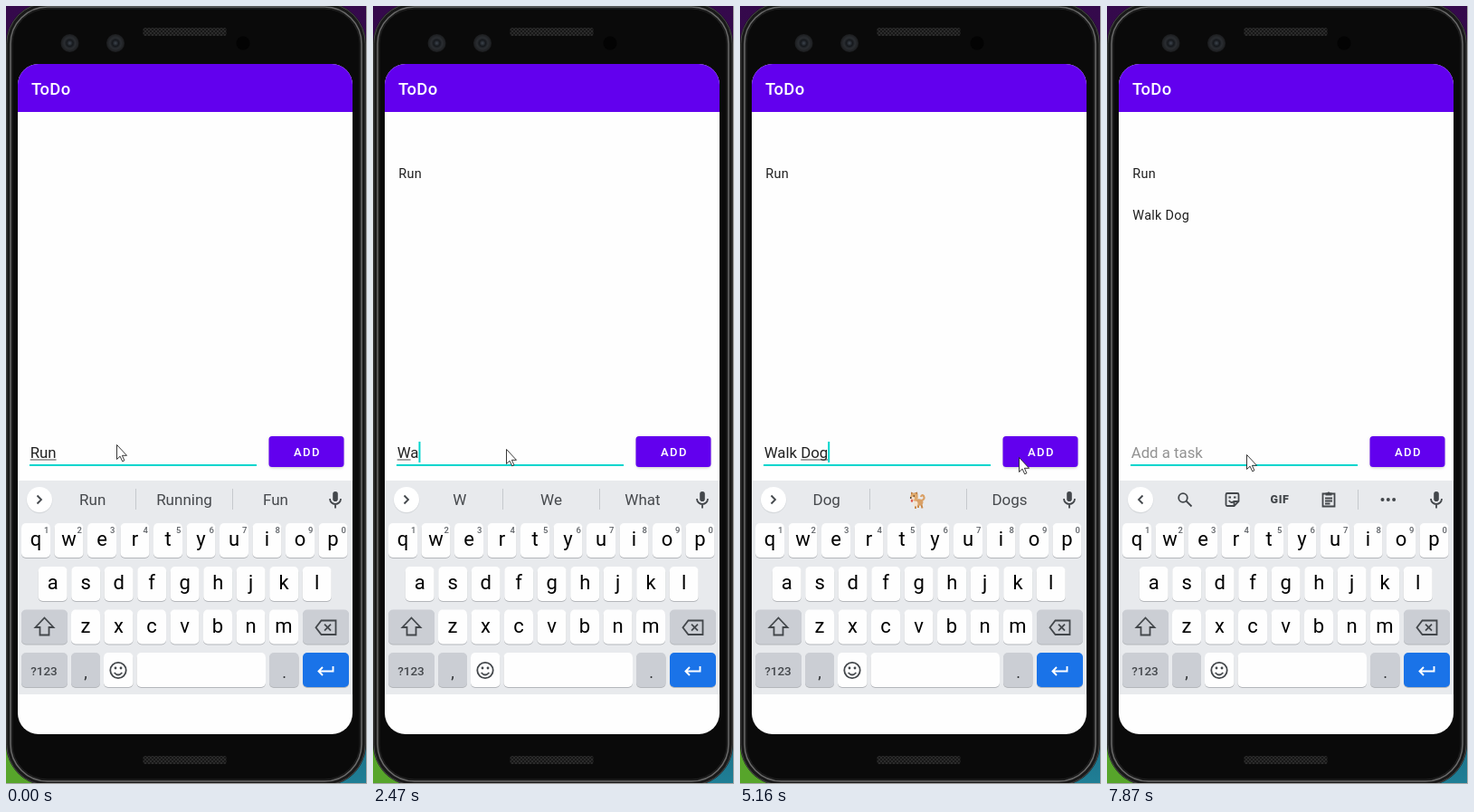
These frames come from a looping animation (399 by 859 pixels, 8 s). An HTML page:

```html
<!DOCTYPE html>
<html lang="en">
<head>
<meta charset="utf-8">
<title>ToDo</title>
<style>
  html, body { margin: 0; width: 100%; height: 100%; overflow: hidden; background: #12081a; }
  svg { display: block; font-family: Roboto, sans-serif; }
  text { white-space: pre; }
  .rim { fill: none; }
  .item { font-size: 14.4px; letter-spacing: .3px; fill: #1f1f1f; }
  .field { font-size: 16.8px; }
  .word { font-size: 17px; fill: #46494d; text-anchor: middle; }
  .letter { font-size: 22px; fill: #000; text-anchor: middle; }
  .mark { font-size: 18px; fill: #2e3134; text-anchor: middle; }
  .digit { font-size: 9.5px; font-weight: 500; fill: #5f6368; text-anchor: middle; }
  .icon { fill: none; stroke: #43474b; stroke-width: 1.8; }
  .solid { fill: #43474b; }
  .split { stroke: #c6c9cd; }
</style>
</head>
<body>
<svg width="399" height="859" viewBox="0 0 399 859">
  <defs>
    <linearGradient id="wall" x2="0" y2="1">
      <stop offset="0" stop-color="#35094c"/>
      <stop offset=".6" stop-color="#1b1030"/>
      <stop offset="1" stop-color="#1f7f96"/>
    </linearGradient>
    <pattern id="mesh" width="4" height="4" patternUnits="userSpaceOnUse">
      <rect width="4" height="4" fill="#2b2b2b"/>
      <path d="M0 0L4 4M4 0L0 4" stroke="#171717"/>
    </pattern>
    <radialGradient id="lens">
      <stop offset="0" stop-color="#3d444d"/>
      <stop offset=".35" stop-color="#15181c"/>
      <stop offset=".6" stop-color="#2a2d31"/>
      <stop offset="1" stop-color="#1b1c1e"/>
    </radialGradient>
    <clipPath id="screen"><rect x="13" y="64" width="370" height="740" rx="23"/></clipPath>
    <filter id="soft" x="-20%" y="-40%" width="140%" height="200%"><feGaussianBlur stdDeviation="1.8"/></filter>
  </defs>

  <rect width="399" height="859" fill="url(#wall)"/>
  <path d="M0 800H60V859H0Z" fill="#57a52b"/>
  <rect x="0" y="-4" width="398" height="865" rx="46" fill="#191919"/>
  <rect class="rim" x=".8" y="-3.200" width="396.400" height="863.400" rx="45" stroke="#484848"/>
  <rect class="rim" x="5" y="1" width="388" height="855" rx="41" stroke="#6a6a6a" stroke-width="1.500"/>
  <rect x="7" y="3" width="384" height="851" rx="39" fill="#0a0a0a" stroke="#202020"/>
  <path d="M398 0h1v859h-399v-1h398z" fill="#a8a8a8"/>
  <rect x="151.5" y="24" width="92" height="9" rx="2" fill="url(#mesh)"/>
  <rect x="151.5" y="828" width="92" height="9" rx="2" fill="url(#mesh)"/>
  <circle cx="70.5" cy="41" r="10" fill="url(#lens)"/>
  <circle cx="121" cy="41" r="10" fill="url(#lens)"/>
  <circle cx="262" cy="41" r="7.5" fill="#030303"/>

  <g clip-path="url(#screen)">
    <rect x="13" y="64" width="370" height="740" fill="#fefefe"/>
    <rect x="13" y="64" width="370" height="53" fill="#6200ee"/>
    <text x="28" y="97.500" font-size="18.400" font-weight="500" letter-spacing=".3" fill="#fff">ToDo</text>
    <text class="item" x="28.300" y="190">Run</text>
    <text class="item" x="28.300" y="235.500">Walk Dog</text>

    <rect x="26" y="506" width="251" height="2" fill="#03d5cd"/>
    <text id="hint" class="field" x="26.7" y="499" fill="#929292">Add a task</text>
    <text id="typed" class="field" x="26.7" y="499" fill="#212121"></text>
    <rect id="under" y="500.5" height="1" fill="#4a4a4a"/>
    <rect id="caret" y="481" width="2" height="23" fill="#03d5cd"/>

    <rect id="shade" x="291" width="82" height="34" rx="4" filter="url(#soft)"/>
    <rect id="button" x="290.5" y="475" width="83" height="34" rx="3.5"/>
    <text x="318" y="496.700" font-size="13" font-weight="500" letter-spacing="1.4" fill="#fff">ADD</text>

    <rect x="13" y="524" width="370" height="236" fill="#e8eaed"/>
    <circle cx="37" cy="545.8" r="14.4" fill="#d6d9dc"/>
    <circle cx="37" cy="545" r="14" fill="#fff"/>
    <path id="chevron" class="icon"/>
    <g id="words">
      <path class="split" d="M143.5 533V556M250.5 533V556"/>
      <text class="word" x="95.700" y="551.200"></text>
      <text class="word" x="197" y="551.200"></text>
      <text class="word" x="298" y="551.200"></text>
      <g id="dog">
        <path d="M200 546q5-1 3-5q-2-2-3 1" fill="none" stroke="#d9a066" stroke-width="2.200"/>
        <path d="M194 550v5M197 550v4M200 549l1.500 5.500" stroke="#c98a4b" stroke-width="2"/>
        <ellipse cx="197.500" cy="548" rx="5" ry="3.800" fill="#d9a066"/>
        <ellipse cx="194" cy="549.500" rx="2.500" ry="3" fill="#f3e4d2"/>
        <path d="M189 540v-3.500l3 1.500 4-1.500.5 4z" fill="#b97a3f"/>
        <circle cx="192.500" cy="542" r="4.300" fill="#dfa96c"/>
        <ellipse cx="190.500" cy="543.800" rx="2.600" ry="2" fill="#f3e4d2"/>
        <ellipse cx="190" cy="546.300" rx="1.100" ry="1.700" fill="#e2574c"/>
        <circle cx="192.300" cy="541" r=".8" fill="#3a2a20"/>
        <circle cx="188.800" cy="543" r=".9" fill="#3a2a20"/>
      </g>
    </g>
    <g id="tools">
      <circle class="icon" cx="84" cy="543" r="4.800"/>
      <path class="icon" d="M87.500 546.500L93.500 552.500" stroke-width="2.200"/>
      <path class="icon" d="M133 538H144Q145.500 538 145.500 539.500V547L140.500 552H133Q131.500 552 131.500 550.500V539.500Q131.500 538 133 538ZM145 547H140.500V552M134.800 546q2.500 3.500 5.500 1" stroke-width="1.600"/>
      <path class="solid" d="M134.500 541.500h2.500v2h-2.500zM140 541.500h2.500v2h-2.500z"/>
      <text class="solid" x="191" y="549.300" font-size="12.500" font-weight="900" text-anchor="middle" letter-spacing=".6">GIF</text>
      <path class="icon" d="M238.500 538.500H251.500V552.500H238.500ZM241 543.500H249M241 546.500H249M241 549.500H246.500" stroke-width="1.600"/>
      <path class="solid" d="M241.500 537.500h2a1.600 1.600 0 0 1 3 0h2v3h-7z"/>
      <path class="split" d="M277.500 534V556"/>
      <g class="solid">
        <circle cx="304.500" cy="545" r="2"/><circle cx="310.800" cy="545" r="2"/><circle cx="317.100" cy="545" r="2"/>
      </g>
    </g>
    <rect class="solid" x="361.200" y="536" width="5.600" height="11" rx="2.800"/>
    <path class="icon" d="M358 544a6 6 0 0 0 12 0M364 550V554.500" stroke-width="1.700"/>

    <g id="keys"></g>
    <path id="shift" class="icon" d="M42.500 675.500L52.500 686H47.500V694.500H37.500V686H32.500Z"/>
    <path class="icon" d="M348.500 678.500H364.500V694H348.500L342.500 686.200ZM352 682.700L359 689.700M359 682.700L352 689.700"/>
    <text class="solid" x="42" y="738.500" font-size="13.500" font-weight="500" text-anchor="middle">?123</text>
    <circle class="icon" cx="124" cy="733.500" r="8.700"/>
    <path class="icon" d="M119.700 736q4.300 5 8.600 0"/>
    <circle class="solid" cx="121" cy="731" r="1.400"/>
    <circle class="solid" cx="127" cy="731" r="1.400"/>
    <path d="M361.500 729V734.500H345.500M350 730L345.500 734.500L350 739" fill="none" stroke="#fff" stroke-width="1.900"/>
  </g>
  <path id="pointer" d="M0 0V16L3.600 12.700L6.200 18.300L8.400 17.300L5.900 11.800H11Z" fill="#fff" stroke="#222" stroke-width=".9"/>
</svg>

<script>
const LOOP = 8000, LEFT = 26.7, PITCH = 36.5;
const $ = id => document.getElementById(id);
const set = (el, attrs) => { for (const k in attrs) el.setAttribute(k, attrs[k]); };
const show = (el, on) => { el.style.display = on ? '' : 'none'; };

function add(tag, attrs, label = '') {
  const el = document.createElementNS('http://www.w3.org/2000/svg', tag);
  set(el, attrs);
  el.textContent = label;
  return $('keys').appendChild(el);
}

function key(x, y, width, fill = '#fefefe') {
  add('rect', { x, y: y + 1, width, height: 38, rx: 5, fill: '#b4b7bb' });
  add('rect', { x, y, width, height: 38, rx: 5, fill });
}

const letters = [];
function row(chars, x, y, digits) {
  [...chars].forEach((c, i) => {
    const left = x + i * PITCH;
    key(left, y, 32);
    letters.push(add('text', { class: 'letter', x: left + 16, y: y + 25.2 }, c));
    if (digits) add('text', { class: 'digit', x: left + 27.7, y: y + 11 }, (i + 1) % 10);
  });
}

const GREY = '#cbced4';
row('qwertyuiop', 17, 571, true);
row('asdfghjkl', 35.7, 619);
row('zxcvbnm', 72, 666.5);
key(17, 666.5, 51, GREY);
key(328, 666.5, 51, GREY);
key(17, 714, 51, GREY);
key(72, 714, 32, GREY);
key(108, 714, 32.5);
key(144.5, 714, 142.5);
key(291, 714, 32.5, GREY);
key(328, 714, 51, '#1a73e8');
add('text', { class: 'mark', x: 88, y: 742 }, ',');
add('text', { class: 'mark', x: 307.5, y: 742 }, '.');

// Each step changes part of the state and holds until the next one.
const steps = [
  [0, { text: 'Run', line: [0, 3], words: 'Run Running Fun', caret: 0, at: [122, 484], press: 0, items: 0, caps: 0 }],
  [140, { caret: 1, at: [141, 487] }],
  [270, { at: [198, 493] }],
  [410, { at: [262, 498] }],
  [550, { at: [309, 499] }],
  [690, { press: 1 }],
  [870, { text: '', line: [0, 0], at: [262, 515] }],
  [1050, { at: [180, 501] }],
  [1210, { items: 1, press: 0, at: [152, 492] }],
  [1350, { words: '', at: [147, 489] }],
  [1620, { caret: 0 }],
  [1770, { caret: 1 }],
  [2060, { caps: 1 }],
  [2200, { text: 'W', caps: 0 }],
  [2340, { words: 'W We What', line: [0, 1] }],
  [2470, { text: 'Wa' }],
  [2600, { words: 'Wa Was Want', line: [0, 2] }],
  [2730, { text: 'Walk' }],
  [2860, { words: 'Walk Walks Walking', line: [0, 4] }],
  [3110, { text: 'Walk ' }],
  [3390, { text: 'Walk D', line: [5, 6] }],
  [3540, { words: "D Do Don't" }],
  [4470, { text: 'Walk Dog', line: [5, 8] }],
  [4610, { words: 'Dog * Dogs' }],
  [4750, { at: [176, 490] }],
  [4890, { at: [232, 493] }],
  [5020, { at: [282, 496] }],
  [5150, { at: [308, 498] }],
  [5290, { at: [311, 498] }],
  [5430, { press: 1 }],
  [5550, { text: '', line: [0, 0], items: 2 }],
  [5690, { press: 0, at: [300, 499] }],
  [5830, { at: [252, 500] }],
  [5960, { words: '', at: [200, 498] }],
  [6100, { at: [168, 496] }],
  [6240, { at: [154, 495] }],
  [6370, { caret: 0 }],
  [6510, { caret: 1 }],
  [6910, { caret: 0 }],
  [7470, { caret: 1 }],
  [7870, { caret: 0 }]
];

let state = {};
const scenes = steps.map(([time, change]) => ({ time, ...(state = { ...state, ...change }) }));

const pen = document.createElement('canvas').getContext('2d');
pen.font = '16.8px Roboto, sans-serif';
const widthOf = s => pen.measureText(s).width;

const items = document.querySelectorAll('.item');
const words = document.querySelectorAll('.word');

function draw({ text, line, words: hints, caret, at, press, items: count, caps }) {
  $('typed').textContent = text;
  show($('hint'), !text);
  const from = widthOf(text.slice(0, line[0]));
  set($('under'), { x: LEFT + from, width: widthOf(text.slice(0, line[1])) - from });
  set($('caret'), { x: text ? LEFT + widthOf(text) : 26.2 });
  show($('caret'), caret);

  items.forEach((el, i) => show(el, i < count));
  set($('button'), { fill: press ? '#7d33f0' : '#6200ee' });
  set($('shade'), { y: press ? 477.5 : 476, fill: press ? '#00000048' : '#00000038' });

  const list = hints.split(' ');
  words.forEach((el, i) => { el.textContent = list[i] === '*' ? '' : list[i] || ''; });
  show($('dog'), list[1] === '*');
  show($('words'), hints);
  show($('tools'), !hints);
  set($('chevron'), { d: hints ? 'M34.500 540.500l4.500 4.500-4.500 4.500' : 'M39.500 540.500l-4.500 4.500 4.500 4.500' });

  letters.forEach(el => {
    el.textContent = caps ? el.textContent.toUpperCase() : el.textContent.toLowerCase();
  });
  $('shift').style.fill = caps ? '#43474b' : 'none';
  set($('pointer'), { transform: `translate(${at[0] + .5} ${at[1] + .5})` });
}

let shown;
function tick() {
  const t = performance.now() % LOOP;
  const scene = scenes.findLast(s => s.time <= t);
  if (scene !== shown) draw(shown = scene);
  requestAnimationFrame(tick);
}
tick();
</script>
</body>
</html>
```
